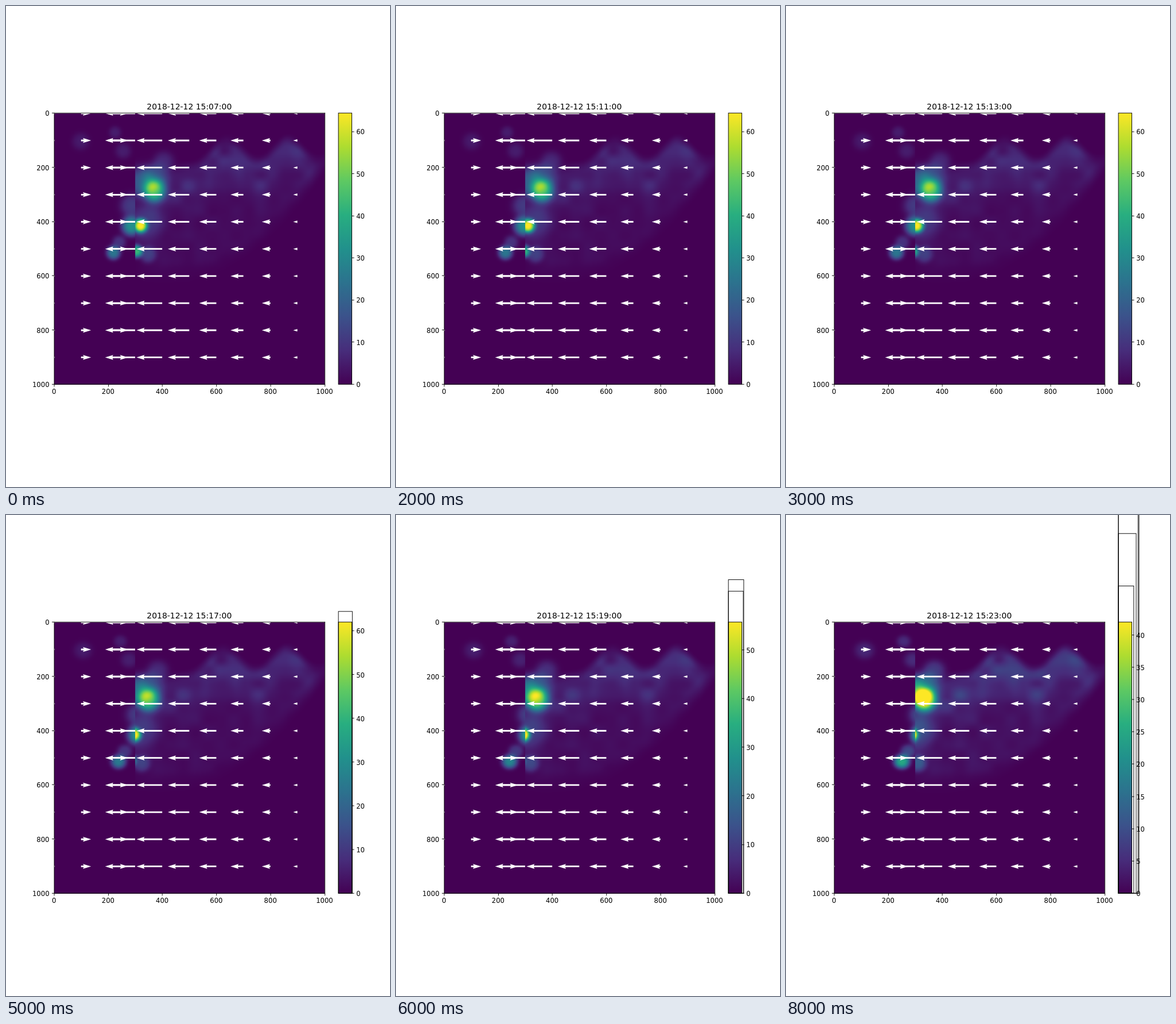
Recreate the animation shown at these times as an HTML page with a canvas. Size 669 by 837 pixels, loop 9 s.

```html
<!DOCTYPE html>
<html lang="en">
<head>
<meta charset="utf-8">
<style>
html, body { margin: 0; width: 669px; height: 837px; overflow: hidden; background: #fff; }
canvas, svg { position: absolute; left: 0; top: 0; }
canvas { left: 83.63px; top: 186.65px; width: 471.65px; height: 472px; }
svg { font-family: "DejaVu Sans", sans-serif; }
</style>
</head>
<body>
<canvas id="heat" width="564" height="564"></canvas>
<svg id="plot" width="669" height="837" viewBox="0 0 800 1000" preserveAspectRatio="none"></svg>
<script>
// The chart is laid out on an 800 x 1000 page; the field uses axis units, 0 to 1000.
const SIZE = 563.64, L = 100, T = 223.2, R = L + SIZE, B = T + SIZE;
const BAR_L = 691.82, BAR_R = 720, SEAM = 300, STEPS = 9, DRIFT = 5;
const VIRIDIS = ['440154', '472d7b', '3b528b', '2c728e', '21918c', '28ae80', '5ec962', 'addc30', 'fde725'];
const RGB = VIRIDIS.map(h => [0, 2, 4].map(i => parseInt(h.substr(i, 2), 16)));

// The top of the scale holds for five steps, then falls.
const FALL = [64.4, 62, 55.7, 47.6, 42];
const peakAt = step => FALL[Math.max(0, step - 4)];

// Main cells as x, y, radius, height; each side of the seam drifts by itself.
const LEFT_CELLS = [
  [286, 415, 28, 32], [288, 340, 34, 11], [219, 513, 20, 25], [240, 475, 20, 9],
  [98, 103, 25, 4.5], [225, 70, 18, 5], [255, 138, 23, 5]
];
const RIGHT_CELLS = [
  [319, 414, 20, 56], [330, 405, 55, 9], [303, 508, 18, 42], [347, 520, 24, 11],
  [372, 285, 32, 33], [372, 235, 38, 13], [323, 255, 45, 17], [405, 178, 30, 7]
];

const ramp = t => { t = Math.max(0, Math.min(1, t)); return t * t * (3 - 2 * t); };
const mix = (a, b, t) => a + (b - a) * t;
const bell = t => Math.exp(-t * t);

function hash(i, j) {
  const s = Math.sin(i * 127.1 + j * 311.7) * 43758.5453;
  return s - Math.floor(s);
}

function noise(x, y) {
  const i = Math.floor(x), j = Math.floor(y), u = ramp(x - i), v = ramp(y - j);
  return mix(mix(hash(i, j), hash(i + 1, j), u), mix(hash(i, j + 1), hash(i + 1, j + 1), u), v);
}

// A faint plume between a wavy upper edge and a curved lower edge.
function haze(x, y) {
  const top = 105 - 38 * Math.cos((x - 640) / 36) + 130 * bell((x - 390) / 95);
  const bottom = 640 - 400 * (Math.max(0, x - 420) / 575) ** 2;
  if (y < top || y > bottom) return 0;
  const edge = ramp((y - top) / 60) * ramp((bottom - y) / 100) * ramp((x - 280) / 120);
  return edge * (2 + 4.5 * bell((y - top - 80) / 90)) * (0.5 + noise(x / 45, y / 45));
}

function cells(list, x, y) {
  let sum = 0;
  for (const [cx, cy, r, h] of list) {
    const d = Math.hypot(x - cx, y - cy) / r;
    if (d < 2.5) sum += h * Math.exp(-d * d * d / 2);
  }
  return sum;
}

function drawHeat(step) {
  const ctx = heat.getContext('2d'), n = heat.width, img = ctx.createImageData(n, n);
  const pullL = Math.exp(-DRIFT * step / SEAM), pullR = Math.exp(-DRIFT * step / (1000 - SEAM));
  for (let i = 0; i < n; i++) {
    const x = (i + 0.5) / n * 1000, isLeft = x < SEAM;
    const from = isLeft ? x * pullL : 1000 - (1000 - x) * pullR;
    for (let j = 0; j < n; j++) {
      const y = (j + 0.5) / n * 1000;
      const value = isLeft ? cells(LEFT_CELLS, from, y) : cells(RIGHT_CELLS, from, y) + haze(from, y);
      const c = Math.min(1, value / peakAt(step)) * 8, k = Math.min(7, Math.floor(c));
      const p = (j * n + i) * 4;
      for (let b = 0; b < 3; b++) img.data[p + b] = mix(RGB[k][b], RGB[k + 1][b], c - k);
      img.data[p + 3] = 255;
    }
  }
  ctx.putImageData(img, 0, 0);
}

// Lines sit on the middle of a page pixel, counted from the lower left.
const snapX = x => Math.round(x) + 0.5;
const snapY = y => 1000 - Math.round(1000 - y) - 0.5;
const pen = 'stroke="#000" stroke-width="1.11"';
const text = (x, y, s, anchor, size = 13.89) =>
  `<text x="${x}" y="${y}" text-anchor="${anchor}" font-size="${size}">${s}</text>`;
const line = (x, y, dx, dy) => `<path d="M${snapX(x)} ${snapY(y)}l${dx} ${dy}" ${pen}/>`;

function box(left, top, right, bottom, fill = 'none') {
  const x = snapX(left), y = snapY(top);
  return `<rect x="${x}" y="${y}" width="${snapX(right) - x}" height="${snapY(bottom) - y}" fill="${fill}" ${pen}/>`;
}

function arrow(x, y, len) {
  const size = Math.abs(len), dir = Math.sign(len), shaft = 3.38;
  if (size < shaft) return `<circle cx="${x}" cy="${y}" r="${shaft / 2}"/>`;
  const w = shaft * Math.min(1, size / (5 * shaft));
  const at = (along, side) => `${x + dir * along},${y + side * w}`;
  const neck = size - 4.5 * w, barb = size - 5 * w;
  return `<polygon points="${[at(0, -.5), at(neck, -.5), at(barb, -1.5), at(size, 0),
    at(barb, 1.5), at(neck, .5), at(0, .5)].join(' ')}"/>`;
}

function fixedParts() {
  let arrows = '', axes = '';
  for (let r = 0; r < 10; r++) for (let c = 0; c < 10; c++) {
    const speed = c < 3 ? c / 3 : (c - 10) / 7;
    arrows += arrow(L + c * SIZE / 10, T + r * SIZE / 10, 62.6 * speed);
  }
  for (let v = 0; v <= 1000; v += 200) {
    const d = v / 1000 * SIZE;
    axes += line(L + d, B, 0, 4.86) + text(L + d, 807, v, 'middle');
    axes += line(L, T + d, -4.86, 0) + text(L - 9.7, T + d + 5.3, v, 'end');
  }
  const stops = VIRIDIS.map((c, i) => `<stop offset="${i / 8}" stop-color="#${c}"/>`).join('');
  return `<defs><linearGradient id="ramp" x1="0" y1="1" x2="0" y2="0">${stops}</linearGradient>
    <clipPath id="area"><rect x="${L}" y="${T}" width="${SIZE}" height="${SIZE}"/></clipPath></defs>
    <g fill="#fff" clip-path="url(#area)">${arrows}</g>${axes}` + box(L, T, R, B);
}

function drawBar(step) {
  const peak = peakAt(step), gap = peak < 45 ? 5 : 10;
  let out = box(BAR_L, T, BAR_R, B, 'url(#ramp)');
  // Earlier outlines stay, rescaled to the present range.
  for (const old of FALL.filter(v => v > peak)) {
    const k = old / peak;
    out += box(BAR_L, B - SIZE * k, BAR_L + (BAR_R - BAR_L) * k, B);
  }
  for (let v = 0; v < peak; v += gap) {
    const y = B - v / peak * SIZE;
    out += line(BAR_R, y, 4.86, 0) + text(BAR_R + 9.7, y + 5.3, v, 'start');
  }
  return out;
}

const heat = document.getElementById('heat'), plot = document.getElementById('plot');
const fixed = fixedParts();
let shown = -1;

function tick() {
  const step = Math.floor(performance.now() / 1000) % STEPS;
  if (step !== shown) {
    shown = step;
    drawHeat(step);
    const minute = String(7 + 2 * step).padStart(2, '0');
    plot.innerHTML = fixed + drawBar(step) +
      text(L + SIZE / 2, T - 8.3, `2018-12-12 15:${minute}:00`, 'middle', 16.67);
  }
  requestAnimationFrame(tick);
}
tick();
</script>
</body>
</html>
```
